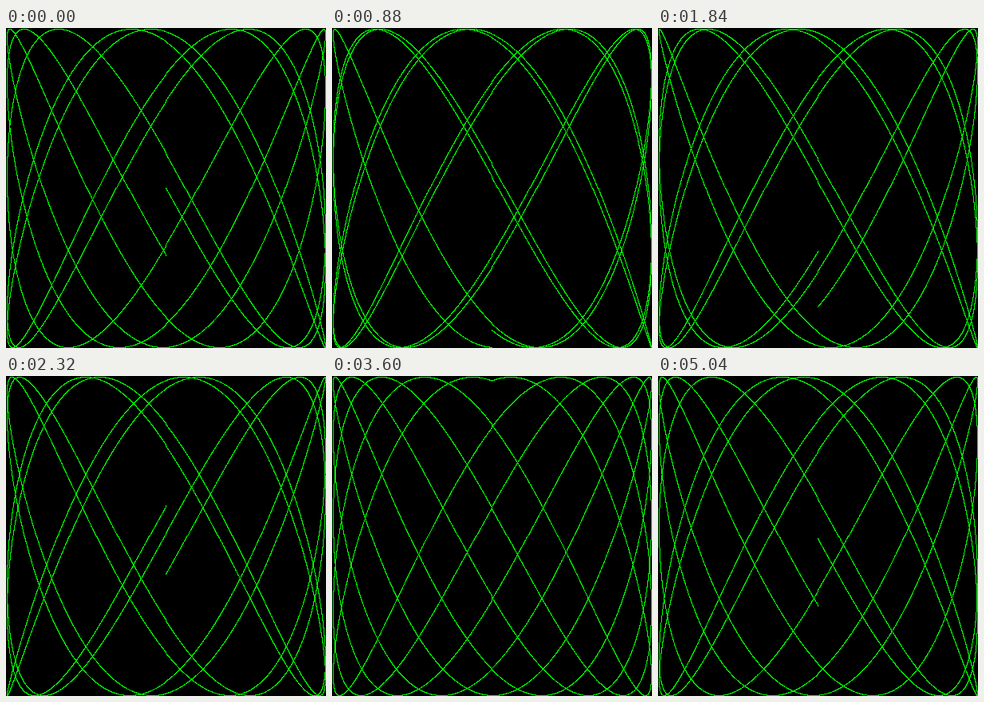
Recreate the animation shown at these times as an HTML page with a canvas. Size 401 px wide and 401 px high, loop 5.12 s.

```html
<!DOCTYPE html>
<html lang="en">
<head>
<meta charset="utf-8">
<title>Lissajous</title>
<style>
  html, body { margin: 0; width: 100%; height: 100%; overflow: hidden; background: #000; }
  canvas { display: block; width: 401px; height: 401px; }
</style>
</head>
<body>
<canvas id="stage" width="401" height="401"></canvas>
<script>
const SIZE = 200;              // canvas covers [-SIZE..SIZE]
const SIDE = 2 * SIZE + 1;
const CYCLES = 5;              // turns of the x oscillator
const RES = 0.001;             // angular step
const FREQ = 0.6046602879796196 * 3;
const STEPS = 64;
const DELAY = 80;
const PHASE_STEP = 0.1;

const ctx = document.getElementById("stage").getContext("2d");
const image = ctx.createImageData(SIDE, SIDE);
const pixels = new Uint32Array(image.data.buffer);
const BLACK = 0xff000000;
const GREEN = 0xff00ff00;

// Truncation toward zero leaves the small kinks on the axes.
const toPixel = v => SIZE + Math.trunc(v * SIZE + 0.5);

function draw(phase) {
  pixels.fill(BLACK);
  for (let t = 0; t < CYCLES * 2 * Math.PI; t += RES) {
    const x = toPixel(Math.sin(t));
    const y = toPixel(Math.sin(t * FREQ + phase));
    pixels[y * SIDE + x] = GREEN;
  }
  ctx.putImageData(image, 0, 0);
}

const start = performance.now();
let shown = -1;

function tick() {
  const step = Math.floor((performance.now() - start) / DELAY) % STEPS;
  if (step !== shown) {
    shown = step;
    draw(step * PHASE_STEP);
  }
  requestAnimationFrame(tick);
}
tick();
</script>
</body>
</html>
```
